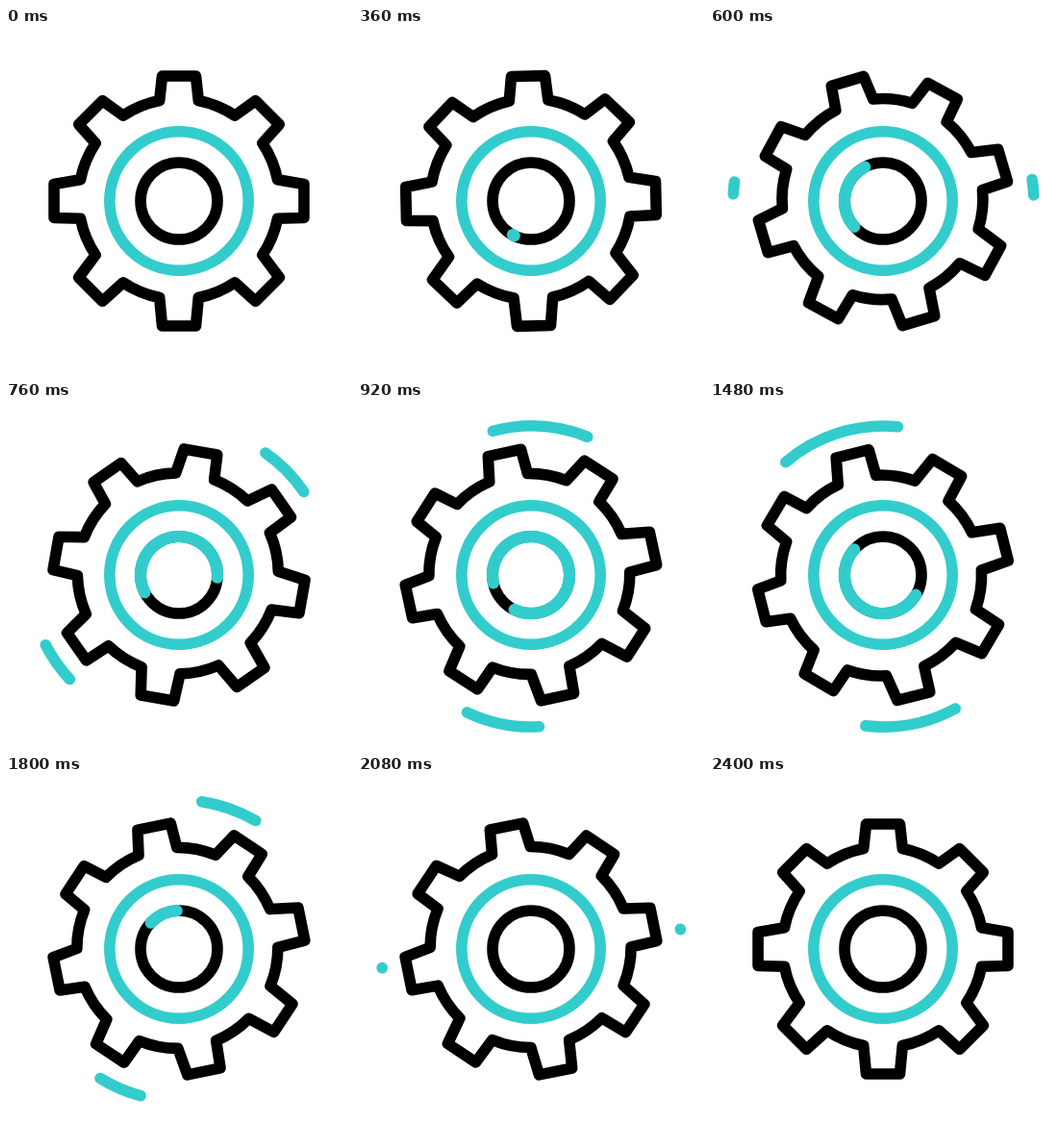
These frames come from a looping animation (360x360 px, 2480 ms). An HTML page with a canvas:

```html
<!DOCTYPE html>
<html>
<head>
<meta charset="utf-8">
<style>
  html, body { margin: 0; width: 100%; height: 100%; overflow: hidden; background: #fff; }
  canvas { display: block; width: 360px; height: 360px; }
</style>
</head>
<body>
<canvas width="360" height="360"></canvas>
<script>
const ctx = document.querySelector('canvas').getContext('2d');
const LOOP = 2480, STEP = 40, LAST = 2400;
const BLACK = '#000', TEAL = '#33cccc', LINE = 11.6;

const rad = deg => deg * Math.PI / 180;
const clamp = x => Math.max(0, Math.min(1, x));
const smooth = x => x * x * (3 - 2 * x);
const progress = (t, from, to) => clamp((t - from) / (to - from));
const ramp = (t, from, to) => smooth(progress(t, from, to));

// The gear swings counterclockwise and back, with soft ends.
function gearTurn(t) {
  const x = t < 1420 ? progress(t, 250, 1420) : progress(t, 2300, 1420);
  return -106 * smooth(x ** 1.15);
}

// The outer dashes swing from the sides to top and bottom, then speed away again.
const dashTurn = t => 100 - 145 * ramp(t, 450, 1115) + 81 * progress(t, 1115, 2075) ** 3;

const hubTurn = t => 172 + 0.0935 * t + 22 * ramp(t, 1400, 2000);

// Eight teeth; the valleys lie on a circle set slightly above the centre.
const gear = new Path2D();
for (let i = 0; i < 8; i++) {
  const a = rad(i * 45), c = Math.cos(a), s = Math.sin(a);
  for (const x of [-17.5, 17.5]) gear.lineTo(x * c + 130 * s, x * s - 130 * c);
  gear.arc(0, -2, 104.5, a - rad(78.8), a - rad(56.2));
}
gear.closePath();

function arc(color, x, y, r, from = 0, to = 360) {
  ctx.strokeStyle = color;
  ctx.beginPath();
  ctx.arc(x, y, r, rad(from - 90), rad(to - 90));
  ctx.stroke();
}

// Draws the part of an arc between the fractions tail and head.
function sweep(x, y, r, start, length, tail, head) {
  if (head > 0 && tail < 1) arc(TEAL, x, y, r, start + length * tail, start + length * head);
}

function draw(t) {
  ctx.fillStyle = '#fff';
  ctx.fillRect(0, 0, 360, 360);
  ctx.lineWidth = LINE;
  ctx.lineCap = ctx.lineJoin = 'round';

  ctx.save();
  ctx.translate(180, 180);
  ctx.rotate(rad(gearTurn(t)));
  ctx.strokeStyle = BLACK;
  ctx.stroke(gear);
  ctx.restore();

  arc(TEAL, 180, 180, 72.2);
  arc(BLACK, 180, 180, 40);

  const turn = dashTurn(t), tail = ramp(t, 1480, 2100), head = ramp(t, 450, 1110);
  sweep(180.5, 181.5, 156.5, turn, 46, tail, head);
  sweep(180.5, 181.5, 156.5, turn + 192, 35.4, tail, head);

  ctx.lineWidth = LINE + 0.8;
  sweep(180, 180, 40, hubTurn(t), 360, ramp(t, 970, 2030), ramp(t, 320, 1110));
}

function tick() {
  const t = performance.now() % LOOP;
  draw(Math.min(Math.floor(t / STEP) * STEP, LAST));
  requestAnimationFrame(tick);
}
tick();
</script>
</body>
</html>
```
